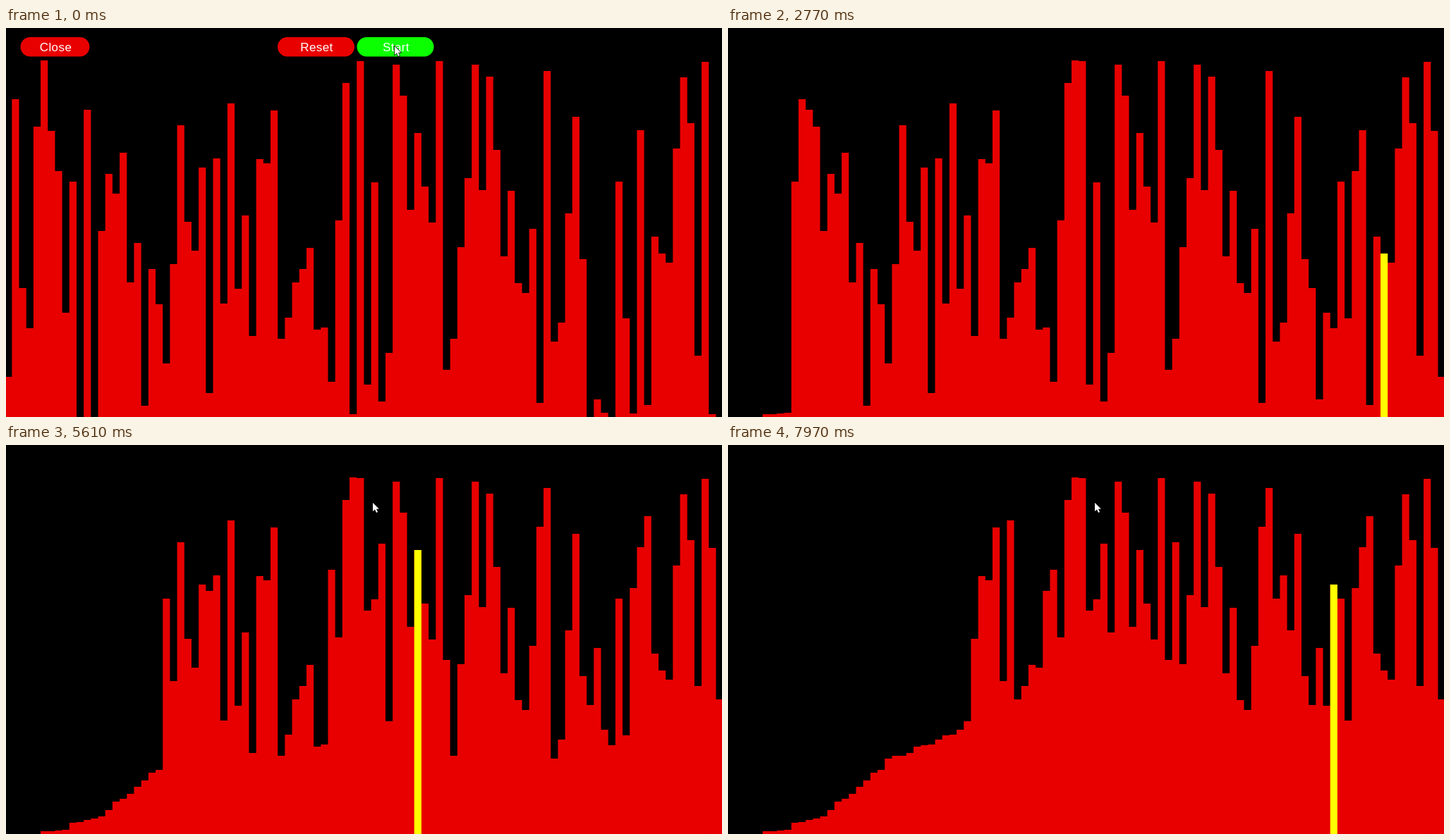
Recreate the animation shown at these times as an HTML page with a canvas. Size 1015 px wide and 552 px high, loop 8 s.

```html
<!DOCTYPE html>
<html>
<head>
<meta charset="utf-8">
<style>
html, body { margin: 0; height: 100%; overflow: hidden; background: #000; }
canvas { display: block; }
</style>
</head>
<body>
<canvas id="stage" width="1015" height="552"></canvas>
<script>
const ctx = document.getElementById('stage').getContext('2d');
const W = 1015, H = 552, LOOP = 8000, TICK = 100 / 3;
const RED = '#e80000', YELLOW = '#ffff00', GREEN = '#0cff00';
const PITCH = 10.185, LEFT = -1.85;
const STEPS_PER_TICK = 12.295, FIRST_TICK = 6.8;

// The unsorted input: top edge of each bar (beyond H the bar is off stage).
const tops = [
  495, 101, 369, 426, 140, 46, 146, 203, 404, 218, 559, 116, 556, 288, 207, 235, 177, 361, 305, 536,
  342, 392, 476, 335, 138, 275, 316, 198, 518, 185, 391, 107, 370, 266, 437, 186, 192, 117, 441, 411,
  361, 342, 312, 428, 425, 502, 273, 78, 548, 47, 506, 219, 530, 461, 52, 96, 258, 149, 225, 276,
  47, 485, 441, 311, 213, 52, 230, 69, 173, 324, 231, 362, 376, 285, 532, 61, 445, 418, 263, 126,
  328, 558, 527, 546, 557, 218, 412, 547, 145, 535, 296, 320, 333, 171, 70, 135, 465, 48, 548, 560
];
const LAST = tops.length - 1;

const ramp = (t, from, to) => Math.min(1, Math.max(0, (t - from) / (to - from)));

// Selection sort stopped after the given number of comparisons.
function sortUntil(steps) {
  const bars = tops.slice();
  let row = 0;
  for (; steps >= LAST - row; row++) {
    let min = row;
    for (let j = row + 1; j <= LAST; j++) if (bars[j] > bars[min]) min = j;
    [bars[row], bars[min]] = [bars[min], bars[row]];
    steps -= LAST - row;
  }
  return { bars, active: row + 1 + steps };
}

function drawBars(bars, active) {
  const addBar = (path, i) => {
    if (bars[i] < H) path.rect(LEFT + PITCH * i, bars[i], PITCH, H - bars[i]);
    return path;
  };
  ctx.fillStyle = RED;
  ctx.fill(bars.reduce((path, top, i) => addBar(path, i), new Path2D()));
  if (active < 0) return;
  ctx.fillStyle = YELLOW;
  ctx.fill(addBar(new Path2D(), active));
}

function drawButton(label, x, width, color) {
  ctx.fillStyle = color;
  ctx.beginPath();
  ctx.roundRect(x, 13, width, 27.5, 13.75);
  ctx.fill();
  ctx.fillStyle = '#fff';
  ctx.font = '17px "Liberation Sans", Arial, sans-serif';
  ctx.letterSpacing = '0.4px';
  ctx.textAlign = 'center';
  ctx.fillText(label, x + width / 2 + 1, 33);
}

const arrow = new Path2D('M0 0V12L3 9.4L5 14L7 13.1L5 8.8H8.8Z');

// The pointer leaves over the top edge and comes back further down.
function drawPointer(tick) {
  const leave = ramp(tick, 70, 80), back = ramp(tick, 101, 109);
  ctx.save();
  ctx.translate(551 - 21 * leave - 10 * back, 26 - 43 * leave + 99 * back);
  ctx.strokeStyle = '#000';
  ctx.lineWidth = 1.4;
  ctx.stroke(arrow);
  ctx.fillStyle = '#fff';
  ctx.fill(arrow);
  ctx.restore();
}

function draw(time) {
  const tick = Math.floor((time % LOOP + 4) / TICK);
  ctx.fillStyle = '#000';
  ctx.fillRect(0, 0, W, H);
  if (tick < 1) {
    drawBars(tops, -1);
    drawButton('Close', 20.5, 98, RED);
    drawButton('Reset', 385, 109, RED);
    drawButton('Start', 497.5, 109, GREEN);
  } else {
    const steps = Math.max(0, Math.floor(STEPS_PER_TICK * (tick - FIRST_TICK)));
    const { bars, active } = sortUntil(steps);
    drawBars(bars, active);
  }
  drawPointer(tick);
}

const start = performance.now();
function loop() {
  draw(performance.now() - start);
  requestAnimationFrame(loop);
}
loop();
</script>
</body>
</html>
```
